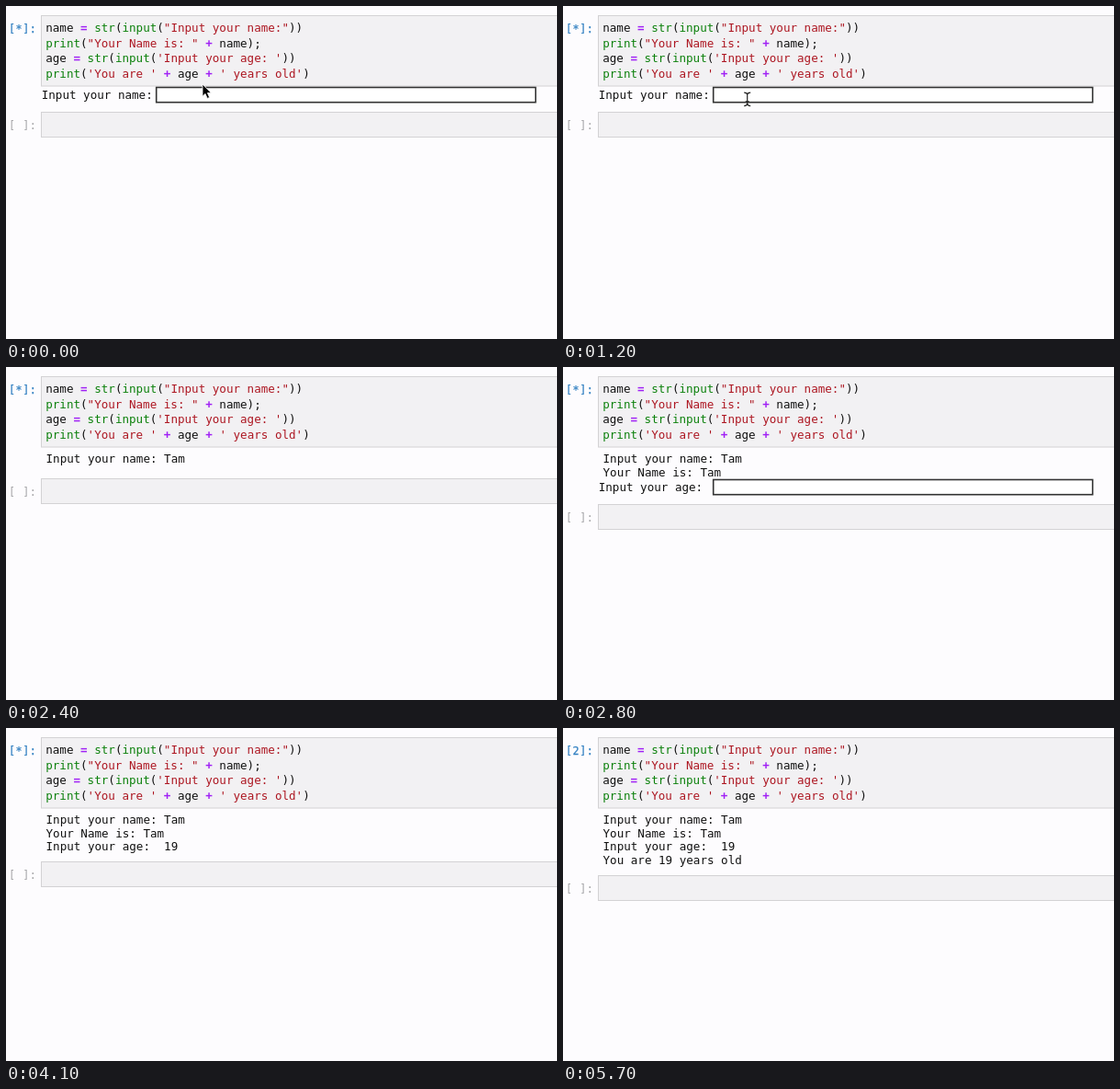
Animation of 600x362 px, one loop 5.8 s. Source, as an HTML page:

```html
<!DOCTYPE html>
<html lang="en">
<head>
<meta charset="utf-8">
<title>Notebook input</title>
<style>
  html, body { margin: 0; width: 100%; height: 100%; overflow: hidden; background: #fdfcfe; }
  svg { display: block; width: 100vw; height: 100vh; }
  text { font: 12.57px "DejaVu Sans Mono", monospace; fill: #111; white-space: pre; }
  .cell { fill: #f2f1f3; stroke: #d3d2d4; }
  .field { fill: #fff; stroke: #333; stroke-width: 1.6; }
  .prompt { font-size: 11.7px; letter-spacing: .53px; fill: #307fc1; stroke: #307fc1; stroke-width: .25; }
  .idle { fill: #a2a2a5; stroke: none; }
  .fn { fill: #0b800b; }
  .str { fill: #ad1722; }
  .op { fill: #a020f5; font-weight: bold; }
</style>
</head>
<body>
<svg viewBox="0 0 600 362" xmlns="http://www.w3.org/2000/svg">
  <rect class="cell" x="38.5" y="10.5" width="580" height="76.5"/>
  <text id="status" class="prompt" x="3" y="29"></text>
  <g id="code"></g>
  <g id="output"></g>
  <g id="entry">
    <text id="question" x="38.7" y="101"></text>
    <rect class="field" x="163.7" y="88.5" width="413" height="16.2"/>
    <text id="typed" x="167" y="101"></text>
  </g>
  <g id="next">
    <rect class="cell" x="38.5" y=".5" width="580" height="27"/>
    <text class="prompt idle" x="3" y="19.3">[ ]:</text>
  </g>
  <path id="arrow" d="M0 0V13.2L3 10.4L5.2 15.4L7.6 14.4L5.4 9.5H9.4Z" fill="#000" stroke="#fff" stroke-width=".8"/>
  <path id="beam" d="M-3.5-7Q-.5-7 0-5Q.5-7 3.5-7M0-5V5M-3.5 7.5Q-.5 7.5 0 5Q.5 7.5 3.5 7.5M-2 2.7H2" fill="none" stroke="#222" stroke-width="1.2"/>
</svg>
<script>
const LOOP = 5800, STEP = 100;
const NAME = "Tam", AGE = "19";
const NAME_DONE = 2400, AGE_ASKED = 2500, AGE_DONE = 4100, FINISHED = 4200;
const $ = id => document.getElementById(id);

const code = [
  'name = str(input("Input your name:"))',
  'print("Your Name is: " + name);',
  "age = str(input('Input your age: '))",
  "print('You are ' + age + ' years old')"
];
const results = [
  "Input your name: " + NAME,
  "Your Name is: " + NAME,
  "Input your age:  " + AGE,
  `You are ${AGE} years old`
];

function addText(parent, x, y) {
  const node = document.createElementNS("http://www.w3.org/2000/svg", "text");
  node.setAttribute("x", x);
  node.setAttribute("y", y);
  return parent.appendChild(node);
}

function highlight(line) {
  return line.replace(/(".*?"|'.*?')|\b(str|input|print)\b|([=+])/g, (token, str, fn) =>
    `<tspan class="${str ? "str" : fn ? "fn" : "op"}">${token}</tspan>`);
}

code.forEach((line, i) => {
  addText($("code"), 43.2, 28.3 + i * 16.4).innerHTML = highlight(line);
});
const outputLines = results.map((line, i) => {
  const node = addText($("output"), 43.5, 104 + i * 14.5);
  node.textContent = line;
  return node;
});

const show = (node, visible) => node.setAttribute("visibility", visible ? "visible" : "hidden");
const move = (node, x, y) => node.setAttribute("transform", `translate(${x} ${y})`);
const ease = (t, from, to) => {
  const p = Math.min(1, Math.max(0, (t - from) / (to - from)));
  return p * p * (3 - 2 * p);
};
const typing = (text, t, start, gap) =>
  text.slice(0, Math.max(0, Math.floor((t - start) / gap) + 1));

function drawPointer(t) {
  const enter = ease(t, 100, 600), settle = ease(t, 600, 1000), leave = ease(t, 4800, 5400);
  const x = 214 - 10 * enter - 3.3 * settle;
  const y = 85 + 20 * enter - 3.8 * settle;
  const inside = y >= 88;
  const leaving = t >= 4900 && t < 5400;
  show($("arrow"), (t < 1700 && !inside) || leaving);
  show($("beam"), t < 1700 && inside);
  move($("beam"), x, y);
  if (leaving) move($("arrow"), 260.5 - 4 * leave, 207 + 158 * leave);
  else move($("arrow"), x, y);
}

function draw(t) {
  const asksName = t < NAME_DONE;
  const asksAge = t >= AGE_ASKED && t < AGE_DONE;
  const lineCount = asksName ? 0 : t < AGE_ASKED ? 1 : asksAge ? 2 : t < FINISHED ? 3 : 4;

  $("status").textContent = t < FINISHED ? "[*]:" : "[2]:";
  outputLines.forEach((node, i) => show(node, i < lineCount));
  show($("entry"), asksName || asksAge);
  move($("entry"), 0, asksAge ? 34 : 0);
  $("question").textContent = asksAge ? "Input your age: " : "Input your name:";
  $("typed").textContent = asksAge ? typing(AGE, t, 3500, 200) : typing(NAME, t, 1700, 200);

  const nextTop = asksName ? 115 : asksAge ? 149 : [0, 121, 0, 145, 160][lineCount];
  move($("next"), 0, nextTop);
  drawPointer(t);
}

const start = performance.now();
function tick() {
  const elapsed = (performance.now() - start) % LOOP;
  draw(Math.floor(elapsed / STEP) * STEP);
  requestAnimationFrame(tick);
}
tick();
</script>
</body>
</html>
```
